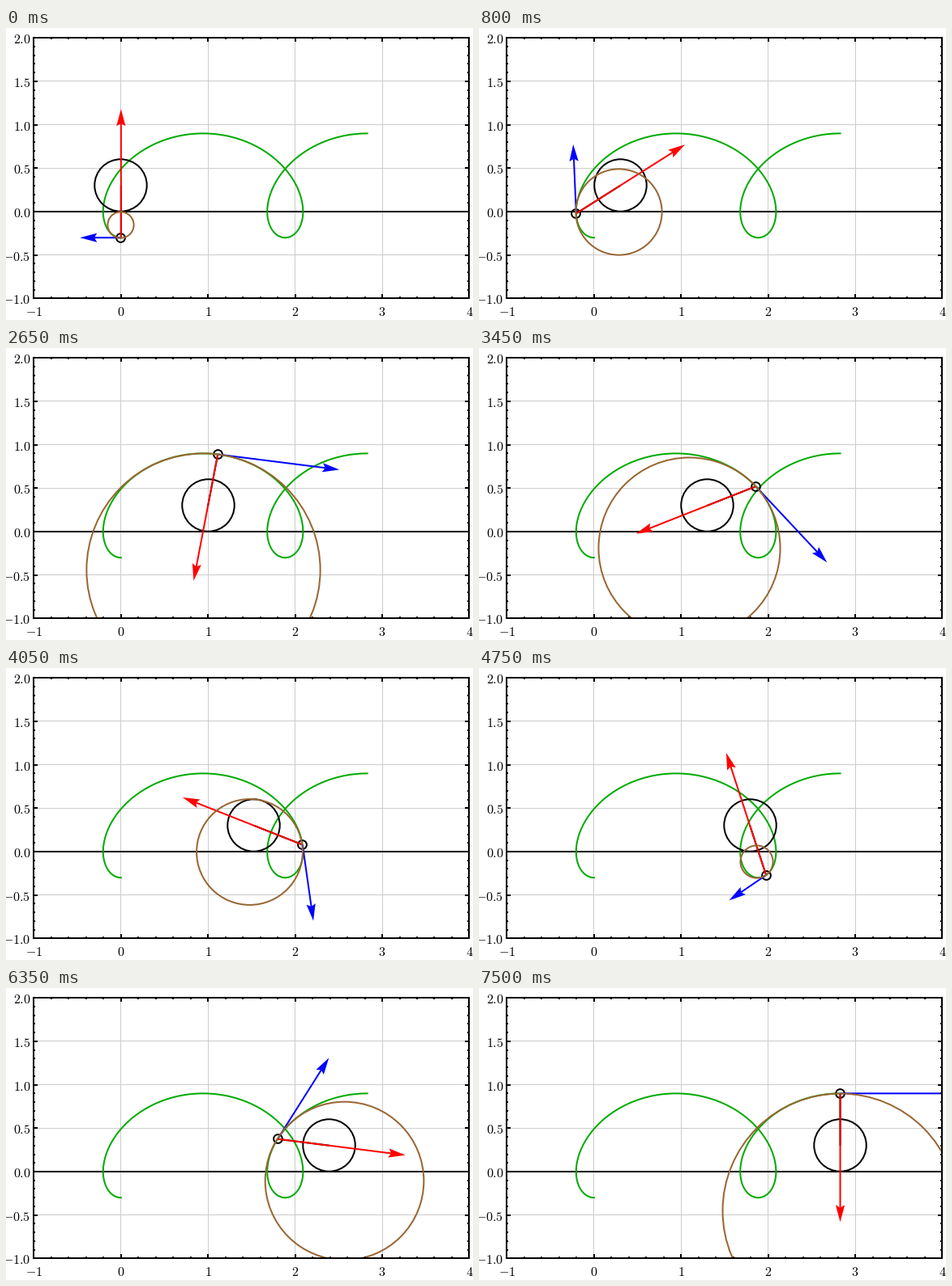
A matplotlib script that plays this animation: 576x361 px, repeating every 7550 ms.

```python
import numpy as np
import matplotlib.pyplot as plt
from matplotlib.animation import FuncAnimation
from matplotlib.patches import Circle
from matplotlib.ticker import FuncFormatter, MultipleLocator
from matplotlib.transforms import ScaledTranslation

W, H, DPI = 576, 361, 100
PX = 72 / DPI                      # one pixel in points
UNIT = 107.4                       # pixels per data unit
LEFT, TOP = 34.45, 12.2
R, D, OMEGA = 0.3, 0.6, np.pi / 2  # wheel radius, arm length, angular speed
FRAMES, DT = 151, 0.04
LW = 2 * PX
GREEN, BROWN = (0, 0.667, 0), (0.6, 0.4, 0.2)

plt.rcParams["mathtext.fontset"] = "cm"
plt.rcParams["font.size"] = 16 * PX

fig = plt.figure(figsize=(W / DPI, H / DPI), dpi=DPI, facecolor="white")
ax = fig.add_axes([LEFT / W, 1 - (TOP + 3 * UNIT) / H, 5 * UNIT / W, 3 * UNIT / H])
ax.set(xlim=(-1, 4), ylim=(-1, 2))
ax.set_axisbelow(False)
for spine in ax.spines.values():
    spine.set_linewidth(LW)

ax.xaxis.set_major_locator(MultipleLocator(1))
ax.xaxis.set_minor_locator(MultipleLocator(0.2))
ax.yaxis.set_major_locator(MultipleLocator(0.5))
ax.yaxis.set_minor_locator(MultipleLocator(0.1))
ax.xaxis.set_major_formatter(FuncFormatter(lambda v, _: f"${v:.0f}$"))
ax.yaxis.set_major_formatter(FuncFormatter(lambda v, _: f"${v + 0.0:.1f}$"))
ax.tick_params(which="both", direction="in", top=True, right=True, width=LW)
ax.tick_params(which="major", length=5 * PX)
ax.tick_params(which="minor", length=2 * PX)
ax.tick_params(axis="x", pad=10 * PX)
ax.tick_params(axis="y", pad=4 * PX)


def shift(dx, dy):
    return ScaledTranslation(dx / DPI, dy / DPI, fig.dpi_scale_trans)


for label in ax.get_yticklabels():
    label.set_transform(label.get_transform() + shift(0, -1))

# Half a pixel up and left makes the hairlines round down to whole pixels.
grid = [ax.axvline(x, color="0.8", lw=PX, zorder=0.5) for x in range(4)]
grid += [ax.axhline(y, color="0.8", lw=PX, zorder=0.5) for y in (-0.5, 0.5, 1, 1.5)]
for line in grid:
    line.set_transform(line.get_transform() + shift(-0.5, 0.5))
ax.axhline(0, color="black", lw=LW, zorder=1)


def position(a):
    return np.array([R * a - D * np.sin(a), R - D * np.cos(a)])


def snapped(p):
    """Nearest pixel centre, in data units."""
    pixel = np.floor(ax.transData.transform(p)) + 0.5
    return ax.transData.inverted().transform(pixel)


def ring(radius, color, z):
    return ax.add_patch(Circle((0, 0), radius, fill=False, ec=color, lw=LW, zorder=z))


def segment(color, z):
    line, = ax.plot([], [], color=color, lw=LW, zorder=z,
                    solid_capstyle="butt", snap=False)
    return line


class Arrow:
    HEAD = np.array([[0, 0], [-21, 5.6], [-17.8, 0], [-21, -5.6]]) / UNIT

    def __init__(self, color, z):
        self.shaft = segment(color, z)
        self.head, = ax.fill([0, 0, 0], [0, 0, 0], color=color, lw=0, zorder=z)

    def set(self, start, vec):
        u = vec / np.hypot(*vec)
        tip = start + vec
        self.shaft.set_data(*np.transpose([start, tip + u * self.HEAD[2, 0]]))
        self.head.set_xy(tip + self.HEAD @ np.array([u, [-u[1], u[0]]]))


ax.plot(*position(np.linspace(0, 3 * np.pi, 600)), color=GREEN, lw=LW, zorder=1.1)
wheel = ring(R, "black", 1.2)
dot = ring(0.05, "black", 1.3)
arm = segment("black", 1.4)
velocity = Arrow("blue", 1.5)
acceleration = Arrow("red", 1.6)
curvature = ring(1, BROWN, 1.7)
ax.set(xlim=(-1, 4), ylim=(-1, 2))


def update(i):
    a = OMEGA * DT * i
    c, s = np.cos(a), np.sin(a)
    p, hub = position(a), np.array([R * a, R])
    v = OMEGA * np.array([R - D * c, D * s])
    acc = OMEGA ** 2 * D * np.array([s, c])
    speed = np.hypot(*v)
    rho = speed ** 3 / abs(v[0] * acc[1] - v[1] * acc[0])

    wheel.center = snapped(hub)
    dot.center = snapped(p)
    arm.set_data(*np.transpose([hub, p]))
    velocity.set(p, v)
    acceleration.set(p, acc)
    curvature.center = snapped(p + rho / speed * np.array([v[1], -v[0]]))
    curvature.set_radius(rho)
    return []


anim = FuncAnimation(fig, update, frames=FRAMES, interval=50, repeat=True,
                     repeat_delay=0, blit=False)
plt.show()
```
